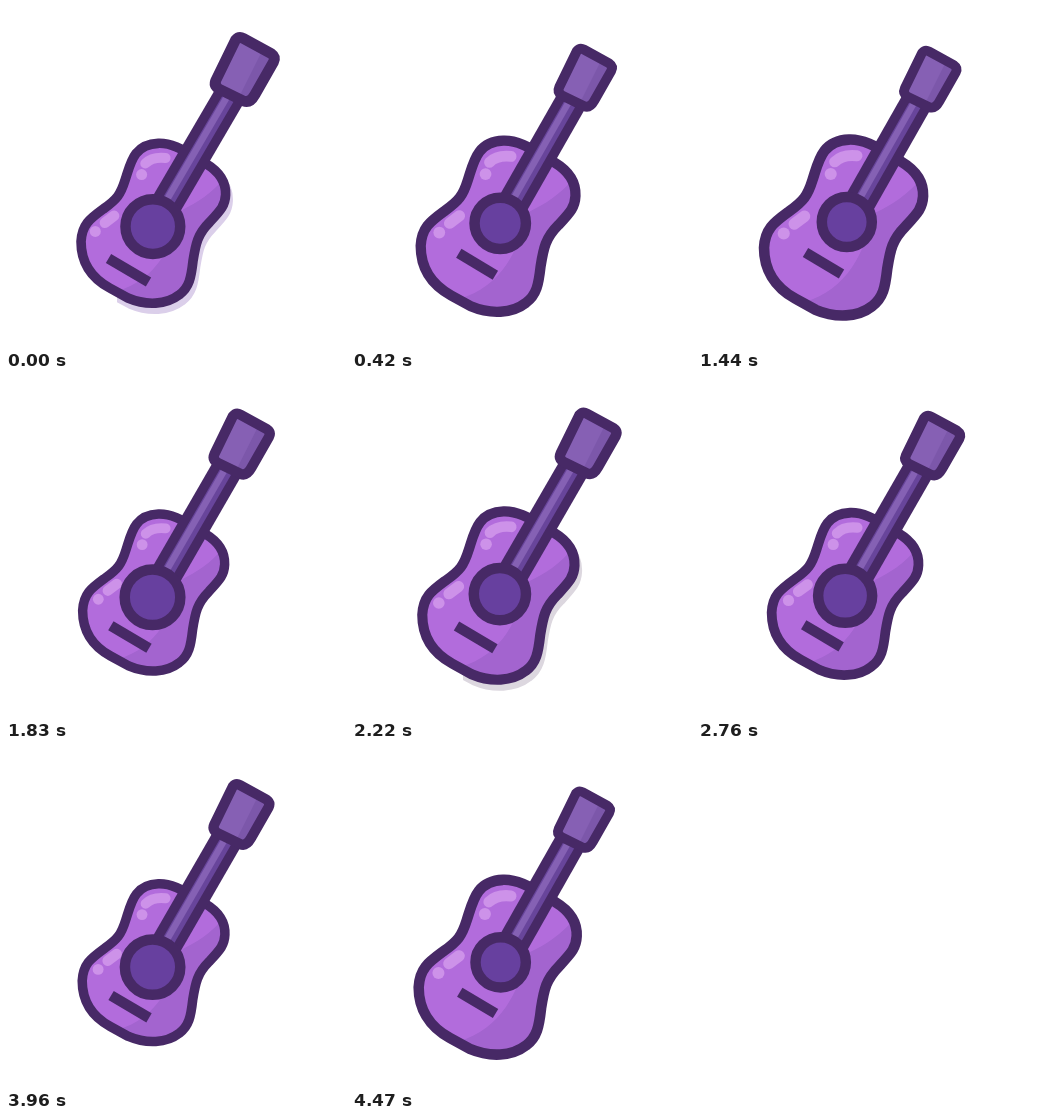
An HTML page for the animation above (4.5 s loop, 340x342 px).

```html
<!DOCTYPE html>
<html lang="en">
<head>
<meta charset="utf-8">
<title>Guitar</title>
<style>
  html, body { margin: 0; width: 100%; height: 100%; overflow: hidden; background: #fff; }
  svg { display: block; width: 340px; height: 342px; }
  .ink { stroke: #472966; }
  .round { fill: none; stroke-linecap: round; }
</style>
</head>
<body>
<svg viewBox="0 0 340 342">
  <defs>
    <path id="shape" d="M151 134C163 133.500 175 138 203 156C218 165 225 177 224.500 190C224 202 219 207 207 220C194 233 192 243 189 262C187 280 185 291 174 299C160 310 138 311 118 302.500L98 291.500C77 280 67 262 67 241C68 222 77 216 92 205C106 195 110 190 115 174C121 156 124 135 151 134Z"/>
    <clipPath id="inside"><use href="#shape"/></clipPath>
    <clipPath id="lowerRight"><path d="M111 170H340V342H111Z"/></clipPath>
  </defs>

  <g clip-path="url(#lowerRight)">
    <use id="shadow" href="#shape" stroke-width="10.500"/>
  </g>

  <g id="body">
    <use href="#shape" fill="#b26cdc"/>
    <path clip-path="url(#inside)" fill="#a364cf" d="M228 166C210 189 194 198 178 206L172 214C168 242 150 283 106 295L130 320H240Z"/>
    <g class="round" stroke="#cd92e9">
      <path stroke-width="11" d="M137 156C143 150 150 149 159 150"/>
      <path stroke-width="12" d="M133 168h.01"/>
      <g id="shine">
        <path stroke-width="11.500" d="M97 217.500L107 210"/>
        <path stroke-width="12" d="M86.500 227h.01"/>
      </g>
    </g>
    <use class="ink" href="#shape" fill="none" stroke-width="10.500" stroke-linejoin="round"/>
  </g>

  <line id="bridge" class="ink" stroke-width="10.500"/>
  <line id="neckEdge" class="ink" stroke-width="31.500"/>
  <line id="neck" stroke="#68459b" stroke-width="12.500"/>
  <line id="neckLight" stroke="#8561b4" stroke-width="6.500"/>
  <circle id="hole" class="ink" fill="#67409f" stroke-width="10.500"/>

  <g id="head">
    <path fill="#8660b4" d="M232 33L268 53L245 95L210 77Z"/>
    <path fill="#7c57aa" d="M257 43L268 53L245 95L233 91Z"/>
    <path class="ink" fill="none" stroke-width="10.800" stroke-linejoin="round" d="M229.500 34Q233 30 237.500 32.500L265 47.500Q270 51 267.500 56L249 88.500Q244 97.500 237.500 95L213 83Q207.500 79.500 210 74Z"/>
  </g>
</svg>
<script>
const LOOP = 4500, FRAMES = 99, BEAT = 24;

// [step in beat, amount]
const squeezeKeys = [[0, 0], [1, .4], [2, 1.05], [4, 1.06], [7, 1], [12, .64], [19, .35], [23, -.04], [24, 0]];
const swellKeys = [[0, .15], [1, .6], [2, .94], [4, .94], [5, 1.03], [7, 1], [9, .75], [12, .28], [14, .08], [16, 0], [19, 0], [22, .05], [24, .15]];

const $ = id => document.getElementById(id);
const mix = (a, b, k) => a + (b - a) * k;
const set = (id, attrs) => {
  for (const name in attrs) $(id).setAttribute(name, attrs[name]);
};
const line = (id, x1, y1, x2, y2) => set(id, { x1, y1, x2, y2 });

function sample(keys, p) {
  const i = keys.findIndex(k => k[0] > p);
  const [p0, v0] = keys[i - 1], [p1, v1] = keys[i];
  return mix(v0, v1, (p - p0) / (p1 - p0));
}

function draw(step) {
  const phase = step % BEAT;
  const squeeze = sample(squeezeKeys, phase);
  const swell = sample(swellKeys, phase);

  const s = (1 + .12 * swell) / 1.109;
  const grow = `translate(165 174.5) scale(${s}) translate(-165 -174.5)`;
  const loose = 1 - squeeze;
  set('body', { transform: grow });
  set('shine', { transform: `translate(${-4 * loose} ${3 * loose})` });

  const tint = phase ? '#dcd7df' : '#dbcfea';
  set('shadow', {
    transform: `translate(2.5 6) ${grow}`,
    fill: tint, stroke: tint,
    visibility: phase < 2 ? 'visible' : 'hidden'
  });

  // the hole follows the body, the bridge and neck follow the head
  const m = (a, b) => mix(a, b, squeeze);
  const w = (a, b) => mix(a, b, swell);
  set('hole', { cx: w(146.5, 148.8), cy: w(221.3, 216), r: w(27.8, 25) });
  line('bridge', m(102.5, 107.5), m(252.5, 246.5), m(142.5, 143.5), m(276, 268));

  const x1 = m(147, 150.5), y1 = m(221, 216), x2 = m(223, 217.5), y2 = m(91, 98);
  line('neckEdge', x1, y1, x2, y2);
  line('neck', x1, y1, x2, y2);
  line('neckLight', x1 - 1.5, y1 - 1, x2 - 1.5, y2 - 1);

  const hs = m(1, .89);
  set('head', {
    transform: `translate(${m(239, 232.5)} ${m(64.5, 74)}) scale(${hs}) translate(-239 -64.5)`
  });
}

const start = performance.now();
function tick(now) {
  const t = Math.max(0, now - start) % LOOP;
  draw(Math.min(FRAMES - 1, Math.floor(t * FRAMES / LOOP + .2)));
  requestAnimationFrame(tick);
}
draw(0);
requestAnimationFrame(tick);
</script>
</body>
</html>
```
